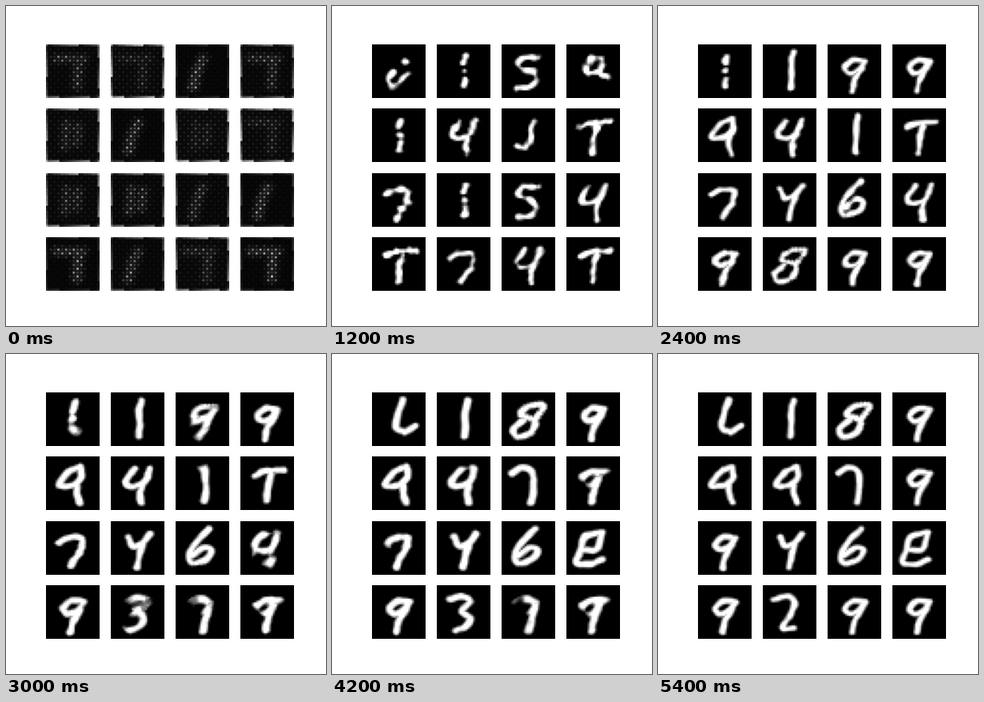
Recreate the animation shown at these times as a matplotlib script. Size 400 px wide and 400 px high, loop 6000 ms.

```python
import numpy as np
import matplotlib.pyplot as plt
from matplotlib.animation import FuncAnimation

SIDE, CELLS, SAMPLES = 67.4, 28, 40
STEPS, STEP_MS = 10, 600
axis = (np.arange(CELLS) + 0.5) * SIDE / CELLS
X, Y = np.meshgrid(axis, axis)
COL, ROW = np.meshgrid(np.arange(CELLS), np.arange(CELLS))


def curve(points):
    """Smooth path through a few key points (Catmull-Rom)."""
    p = np.array(points, float).reshape(-1, 2)
    if len(p) == 1:
        return p
    q = np.vstack([2 * p[0] - p[1], p, 2 * p[-1] - p[-2]])
    t = np.linspace(0, len(p) - 1, SAMPLES)
    i = np.minimum(t.astype(int), len(p) - 2)
    u = (t - i)[:, None]
    a, b, c, d = q[i], q[i + 1], q[i + 2], q[i + 3]
    return b + 0.5 * u * (c - a + u * (2 * a - 5 * b + 4 * c - d
                                       + u * (3 * (b - c) + d - a)))


def distance(strokes):
    """Distance to the strokes; the pen is a little wider than tall."""
    path = np.vstack([curve(s) for s in strokes])
    return np.sqrt(((X[..., None] - path[:, 0]) ** 2 * 0.75
                    + (Y[..., None] - path[:, 1]) ** 2).min(axis=-1))


shapes = {}


def shape(name, *strokes):
    shapes[name] = distance(strokes)


# digits
shape("1", (39, 10, 36, 22, 36, 38, 35, 55))
shape("2", (14, 18, 31, 14, 40, 22, 34, 38, 25, 54, 39, 54))
shape("3", (17, 18, 31, 14, 42, 20, 32, 33, 42, 41, 37, 51, 24, 57))
shape("4", (29, 16, 19, 31, 26, 38, 42, 32, 49, 15), (40, 34, 37, 46, 38, 58))
shape("6", (42, 10, 27, 25, 17, 42, 21, 53, 38, 48, 45, 37, 36, 33, 21, 43))
shape("7", (13, 21, 25, 14, 37, 18, 40, 31, 40, 45, 37, 58))
shape("8", (42, 34, 53, 17, 35, 17, 24, 28, 41, 35, 37, 50, 20, 56, 15, 46, 27, 35))
shape("9", (47, 21, 32, 20, 22, 29, 28, 36, 40, 31, 47, 21), (43, 30, 34, 45, 31, 59))
# half-formed marks
shape("A", (43, 13, 28, 20, 17, 36, 34, 36, 44, 26, 43, 13), (39, 36, 39, 46, 43, 58))
shape("B", (43, 14, 23, 20, 18, 36, 13, 52, 30, 54, 45, 48), (22, 36, 38, 35, 45, 14))
shape("L", (39, 9, 33, 26, 30, 44, 40, 50), (41, 51, 54, 42))
shape("T", (18, 24, 32, 18, 55, 17), (39, 22, 35, 36, 33, 56))
shape("?", (17, 27, 28, 21, 44, 22, 44, 36, 36, 48, 31, 57))
shape("y", (22, 20, 28, 31, 40, 27, 49, 16), (40, 30, 36, 44, 33, 58))
shape("s", (46, 17, 27, 17, 22, 28, 38, 34, 43, 44, 34, 54, 20, 54))
shape("a", (52, 40, 43, 36, 45, 19, 30, 18, 27, 34, 40, 35))
shape("u", (28, 34, 20, 44, 26, 51, 36, 46, 45, 37), (42, 21))
shape("i", (36, 15, 34, 23), (35, 33), (35, 44, 34, 52))
shape("J", (40, 16, 37, 28, 36, 42, 28, 50, 18, 47))
# first glows
shape("-", (14, 18, 46, 18), (41, 20, 39, 52))
shape("/", (34, 18, 27, 34, 22, 54))
shape("|", (26, 20, 24, 48), (40, 22, 38, 44))

# one mark per tile, row by row; missing steps lie halfway between neighbours
stages = {
    0: "--/-" "|/|-" "||//" "-/--",
    1: "|3ss" "?s??" "TT2a" "s3sT",
    2: "uisa" "i4JT" "?is4" "T?4T",
    4: "i199" "A41T" "?y64" "9899",
    6: "L189" "A47T" "?y6B" "937T",
    8: "L189" "AA79" "9y6B" "9399",
    9: "L189" "AA79" "9y6B" "9299",
}
glow_level = [.6, .35, .85, .6, .5, .8, .3, .35, .5, .6, .6, .8, .85, .7, .5, .85]


def field(step, k):
    if step in stages:
        return shapes[stages[step][k]]
    return (field(step - 1, k) + field(step + 1, k)) / 2 - 0.6


def ripple(rng, waves=8):
    """Smooth seeded noise made of a few plane waves."""
    total = np.zeros_like(X)
    for _ in range(waves):
        fx, fy = rng.normal(0, 0.25, 2)
        total += np.sin(fx * X + fy * Y + rng.uniform(0, 2 * np.pi))
    return total / np.sqrt(waves / 2)


def lattice(dist, level, rng):
    """Staggered dots that brighten along the strokes, inside a pale rim."""
    glow = level * np.exp(-(dist / 6) ** 2)
    even = (ROW % 2 == 0) & (COL % 2 == 0)
    mask = 0.1 + 0.25 * even + 0.65 * (even & ((ROW + COL) % 4 == 0))
    rim_x = np.minimum(COL, CELLS - 1 - COL)
    rim_y = np.minimum(ROW, CELLS - 1 - ROW)
    rim = (np.minimum(rim_x, rim_y) == 0) * (0.08 + 0.12 * (ROW + COL) % 2 / 2)
    corner = 0.6 * (rim_x + rim_y == 0)
    haze = 0.02 + (1 - level) * (0.16 * mask + rim + corner)
    return haze + glow * mask * rng.uniform(0.6, 1.1, X.shape)


def tile(step, k):
    rng = np.random.default_rng(100 * step + k)
    dist = field(step, k)
    if step == 0:
        return lattice(dist, glow_level[k], rng)
    half = 3 + 3.6 * (step == 1) + 0.05 * step
    rough = 0.3 + 1.8 * np.exp(-step / 2)
    return np.clip((half - dist + rough * ripple(rng)) / 3 + 0.5, 0, 1)


tiles = [[tile(s, k) for k in range(16)] for s in range(STEPS)]

fig, axes = plt.subplots(4, 4, figsize=(4, 4), dpi=100)
fig.subplots_adjust(left=0.125, right=0.9, bottom=0.11, top=0.88, wspace=0.2, hspace=0.2)
images = []
for ax, first in zip(axes.flat, tiles[0]):
    images.append(ax.imshow(first, cmap="gray", vmin=0, vmax=1))
    ax.axis("off")


def update(step):
    for image, data in zip(images, tiles[step]):
        image.set_data(data)
    return images


anim = FuncAnimation(fig, update, frames=STEPS, interval=STEP_MS, repeat=True, repeat_delay=0)
plt.show()
```
